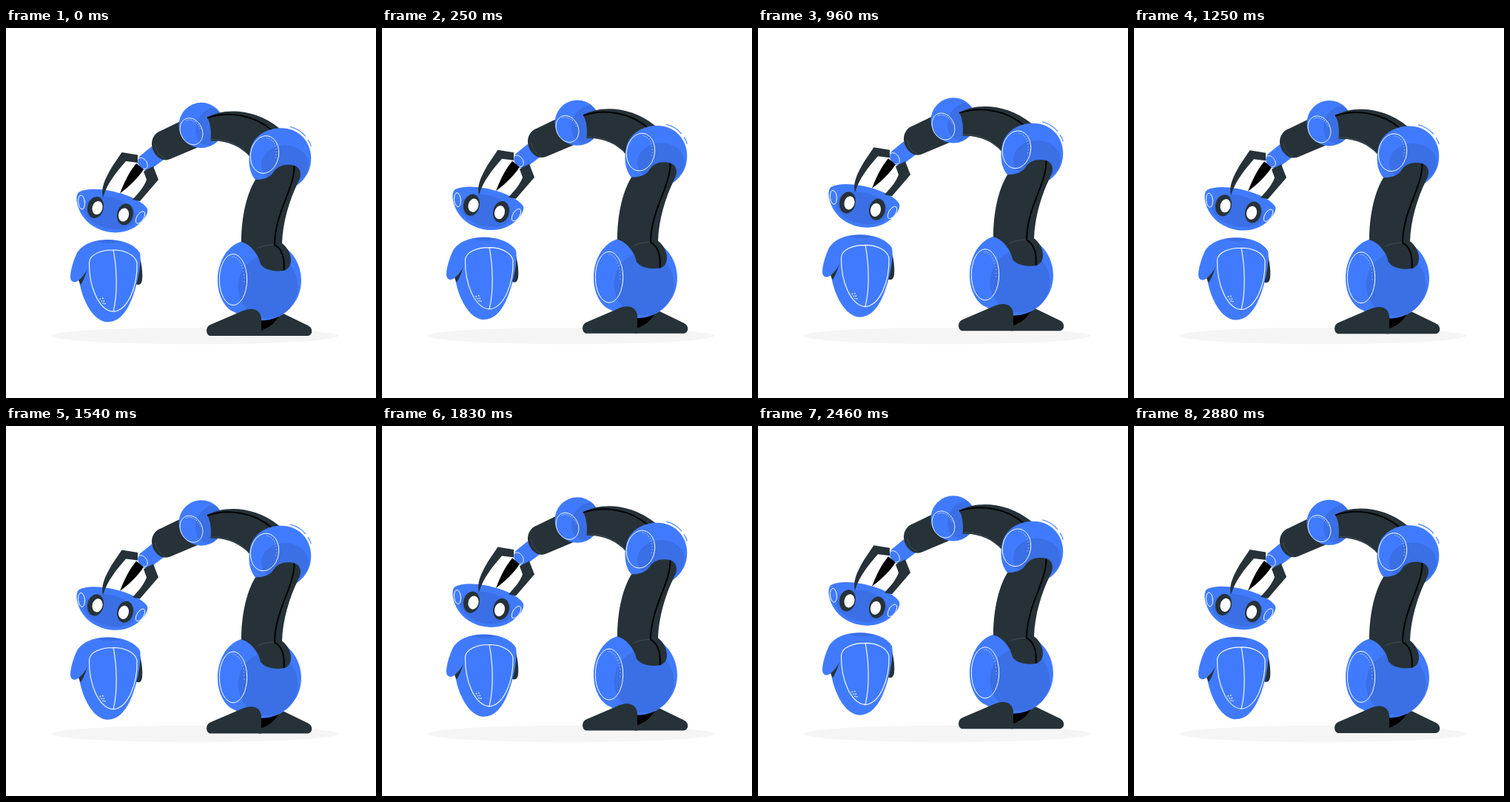
These frames come from a looping animation (500 px wide and 500 px high, 2930 ms). An HTML page with a canvas:

```html
<!DOCTYPE html>
<html lang="en">
<head>
<meta charset="utf-8">
<title>Robot arm</title>
<style>
html, body { margin: 0; width: 100%; height: 100%; overflow: hidden; background: #fff; }
canvas { display: block; width: 500px; height: 500px; }
</style>
</head>
<body>
<canvas id="stage"></canvas>
<script>
const canvas = document.getElementById('stage');
const ctx = canvas.getContext('2d');
const ratio = window.devicePixelRatio || 1;
canvas.width = canvas.height = Math.round(500 * ratio);

const BLUE = '#407bff', SHADE = 'rgba(0,0,0,.1)', DARK = '#263238';
const BLACK = '#000', WHITE = '#fff', FAINT = 'rgba(255,255,255,.16)';
const LOOP = 2930, STEP = 125 / 3, PERIOD = 36, LIFT = 10;

function fill(d, color) {
  ctx.fillStyle = color;
  ctx.fill(new Path2D(d));
}

function line(d, color, width) {
  ctx.strokeStyle = color;
  ctx.lineWidth = width;
  ctx.stroke(new Path2D(d));
}

function oval(x, y, rx, ry, tilt, color, width) {
  ctx.beginPath();
  ctx.ellipse(x, y, rx, ry, tilt * Math.PI / 180, 0, Math.PI * 2);
  if (width) {
    ctx.strokeStyle = color;
    ctx.lineWidth = width;
    ctx.stroke();
  } else {
    ctx.fillStyle = color;
    ctx.fill();
  }
}

// Runs a drawing in its own moved and tilted space
function within(x, y, tilt, paint) {
  ctx.save();
  ctx.translate(x, y);
  ctx.rotate(tilt * Math.PI / 180);
  paint();
  ctx.restore();
}

// Dotted arc running from the top of an ellipse to its right side
function dots(x, y, rx, ry, tilt, count) {
  within(x, y, tilt, () => {
    for (let i = 0; i < count; i++) {
      const a = -Math.PI / 2 + i / (count - 1) * 1.65;
      oval(rx * Math.cos(a), ry * Math.sin(a), .5, .5, 0, WHITE);
    }
  });
}

function base() {
  fill('M345 408C354 407 364 400 368 390L375 386L408 402C415 405 415 415 408 416H341Z', DARK);
  fill('M344 393C355 395 362 392 369 389C364 400 354 407 344 409Z', BLACK);
  fill('M320 288C299 293 286 316 286 341C286 363 297 380 309 384C320 392 332 395.3 345 395.3C375 395.3 399 371 399 341C399 321 389 303 372 293Z', BLUE);
  oval(354, 349.5, 40.5, 42.5, 0, SHADE);
  oval(307, 340, 18.7, 34.5, 0, WHITE, 1);
  dots(306, 340, 16, 31, 0, 12);
  fill('M276 401L318 383C328 378 343 377 345 392V416H276C270 415 269 404 276 401Z', DARK);
}

function upperArm() {
  fill('M272 121C292 109 334 106.500 370 136L330 174.500C317 159.500 298 151.500 276.500 152.500C278 139 276 128 272 121Z', DARK);
  line('M277 150.500C298 150 316 158 329 172', FAINT, .8);
  line('M272 121.500C299 112 335 117 359 138', BLACK, 2);
}

function elbow() {
  fill('M337 205C328 195 327 178 330 165C334 146 352 135.300 372 135.300C395 135.300 412.300 153 412.300 176C412.300 191 406 203 394 212L360 215Z', BLUE);
  oval(377, 185, 32, 26.5, 0, SHADE);
  oval(349.5, 171, 19, 25.5, 10, WHITE, 1);
  dots(349, 171, 16, 22.5, 10, 10);
  line('M384 133.500C392 135.500 400 140.500 405 146.500M408 151C410 153.500 411.500 156.500 412.300 160', BLUE, 1.1);
}

function lowerArm() {
  fill('M337 205C350 205 358 201 362 194C368 185 380 183 390 186C399 189 400 199 395 208C383 232 374 262 373 291C379 295 385 304 385 314C385 323 380 327 374 328C360 330 347 325 344 319C341 305 330 292 318 289C318 262 323 228 337 205Z', DARK);
  line('M339 298C347 294 355 293 363 293', FAINT, .8);
  line('M389.500 186C390 218 363.500 248 363 293C372 298 377 309 375.500 327.500', BLACK, 2);
}

function forearm() {
  fill('M197 160L181 173C175 180 178 190 187 192C191 193 195 191 197 190L213 178Z', BLUE);
  oval(184.5, 183, 5.8, 8.5, -35, WHITE, .9);
  fill('M240 124L209 139C196 144 193 160 203 172C208 178 215 180 222 177L260 161Z', DARK);
  line('M202 158C203 167 208 174 215 176', FAINT, .8);
  oval(264, 131.5, 30.5, 30.7, 0, BLUE);
  fill('M257 146C253 127 263 110 282 107.500C291 114 295 124 294.500 133C293 146 286 156 277 159C267 159 259 154 257 146Z', SHADE);
  oval(250.5, 139.7, 14.6, 18.7, -25, WHITE, .9);
  dots(250.5, 139.7, 12.4, 16.3, -25, 10);
}

function claw() {
  fill('M178 171.500L156.500 168L143 188C133 205 128 217 131 229C137 210 148 196 162 180L178 182Z', DARK);
  fill('M176 183L186 191C178 203 168 213 154 223.500C159 210 166 195 176 183Z', BLACK);
  fill('M189 192L199 187L206 205L181 234L171 232C180 222 187 214 190 205L186 194Z', DARK);
}

function head() {
  within(144.5, 233.4, 13.5, () => {
    fill('M-47 -1C-30 -16 30 -16 47 -1C50 2 49 8 47 13C38 33 20 42.500 0 42.500C-20 42.500 -38 33 -47 13C-49 8 -50 2 -47 -1Z', BLUE);
    oval(0, 17, 36, 21, 0, SHADE);
  });
  oval(102, 235.5, 4.4, 9.5, -6, WHITE, 1);
  oval(181.5, 256, 4.6, 9.2, 32, WHITE, 1);
  oval(121, 242.5, 10.8, 14.7, 12, DARK);
  oval(123.5, 243, 6.9, 9.2, 14, WHITE);
  oval(161, 251.8, 10.8, 14.7, 12, DARK);
  oval(159, 252.5, 6.9, 9.2, 14, WHITE);
}

function body() {
  fill('M179 305C183 315 185 330 184 340C183 347 180 348 175 346Z', DARK);
  fill('M96 304C104 291 121 286 138 286C156 286 174 292 181 304C184 319 176 355 167.500 372C160 388 150 397.300 138 397.300C124 397.300 113 383 107 369C102 358 100 348 98 338Z', BLUE);
  fill('M123 288C132 285.500 146 285.500 155 288.500C147 292 131 292 123 288Z', SHADE);
  fill('M98 341C104 336 108 330 110 325C108 334 104 342 101 347Z', DARK);
  fill('M96 304C91 314 87 328 87 336C87 344 93 345 98 341C104 336 108 330 110 325L112 305L104 296Z', BLUE);
  line('M145 300C128 300 113 306 112.500 317C112 349 125 381.500 145 383.300C165 381.500 178 349 177 317C174 306 160 300 145 300C150 325 151 360 145 383', WHITE, 1.1);
  for (let i = 0; i < 3; i++) {
    oval(127.3 + i * 1.9, 366 + i * 3, .85, .85, 0, WHITE);
    oval(130.7 + i * 1.5, 365.2 + i * 3.6, .85, .85, 0, WHITE);
  }
}

// Held steps at 24 per second; height is a linear rise and fall
function height(ms) {
  const step = Math.ceil((Math.floor(ms / 10) * 10 + 5) / STEP) - 1;
  const phase = (Math.min(step, 69) + .5) % PERIOD / PERIOD;
  return -LIFT * (1 - Math.abs(1 - 2 * phase));
}

function draw(ms) {
  ctx.setTransform(ratio, 0, 0, ratio, 0, 0);
  ctx.fillStyle = WHITE;
  ctx.fillRect(0, 0, 500, 500);
  oval(255, 416, 193.7, 11.3, 0, '#f5f5f5');
  ctx.translate(0, height(ms) + .28);
  base();
  forearm();
  upperArm();
  elbow();
  lowerArm();
  head();
  claw();
  body();
}

const start = performance.now();
function tick() {
  draw((performance.now() - start) % LOOP);
  requestAnimationFrame(tick);
}
tick();
</script>
</body>
</html>
```
